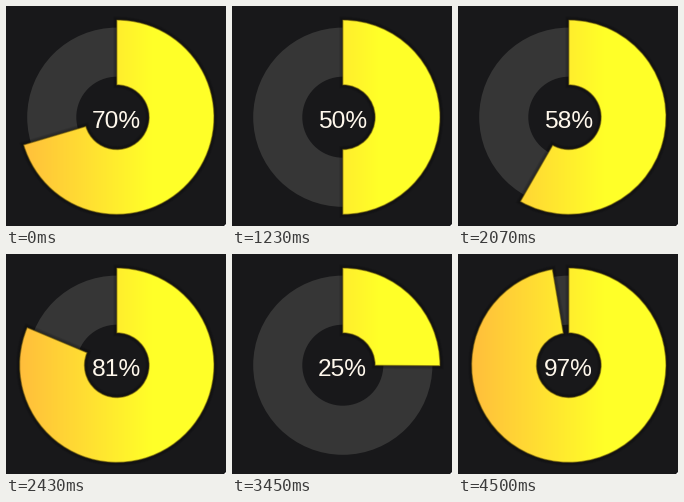
Recreate the animation shown at these times as a matplotlib script. Size 220 by 220 pixels, loop 4.53 s.

```python
import matplotlib.pyplot as plt
import numpy as np
from matplotlib.animation import FuncAnimation
from matplotlib.colors import LinearSegmentedColormap
from matplotlib.patches import Circle, Polygon, Wedge

SIZE, DPI = 220, 100
LOOP_MS, STEP_MS = 4530, 30
PX = 72 / DPI
CENTER = (110.8, 111.2)
BACKGROUND = "#18181a"

# (time in ms, percent): the dial eases from one pose to the next
POSES = [
    (0, 70.4), (540, 48.3), (990, 58), (1080, 58), (1230, 50), (1800, 65),
    (2070, 58.3), (2520, 84), (2760, 73.3), (2970, 73.3), (3450, 25.1),
    (3780, 14), (3960, 14), (4500, 97.3),
]


def percent_at(ms):
    for (t0, v0), (t1, v1) in zip(POSES, POSES[1:]):
        if ms <= t1:
            u = (ms - t0) / (t1 - t0)
            return v0 + (v1 - v0) * u * u * (3 - 2 * u)
    return POSES[-1][1]


fig = plt.figure(figsize=(SIZE / DPI, SIZE / DPI), dpi=DPI, facecolor=BACKGROUND)
ax = fig.add_axes([0, 0, 1, 1])
ax.axis("off")


def sector(**style):
    return ax.add_patch(Wedge(CENTER, 97.2, -90, 0, width=64.9, **style))


ax.add_patch(Circle(CENTER, 89.6, fc="#363636", lw=0, zorder=1))
ax.add_patch(Circle(CENTER, 40.5, fc=BACKGROUND, lw=0, zorder=1))
ax.add_patch(Polygon([(SIZE, SIZE - 2), (SIZE, SIZE), (SIZE - 2, SIZE)],
                     fc="white", lw=0))

shadows = [
    sector(fc="none", ec="black", alpha=0.09, lw=width * PX, zorder=2)
    for width in (7, 5, 3)
]
face = sector(fc="none", lw=0, zorder=3)
rim = sector(fc="none", ec="#5a4a08", alpha=0.5, lw=1.4 * PX, zorder=4)
wedges = shadows + [face, rim]

gold = LinearSegmentedColormap.from_list(
    "gold", [(0, "#ffbe3c"), (0.68, "#ffff28"), (1, "#ffff28")])
fill = ax.imshow(np.linspace(0, 1, 400)[None, :], cmap=gold, aspect="auto",
                 extent=(13, 209, 209, 13), zorder=3)
ax.set_xlim(0, SIZE)
ax.set_ylim(SIZE, 0)

label = ax.text(110.7, 121.5, "", color="#fff8ec", fontsize=24.5 * PX,
                family="Liberation Sans", ha="center", va="baseline", zorder=5)


def draw(frame):
    percent = percent_at(frame * STEP_MS)
    for wedge in wedges:
        wedge.set_theta2(-90 + 3.6 * percent)
    fill.set_clip_path(face)
    label.set_text(f"{percent:.0f}%")
    return [*wedges, fill, label]


anim = FuncAnimation(fig, draw, frames=LOOP_MS // STEP_MS, interval=STEP_MS,
                     repeat=True, repeat_delay=0)
plt.show()
```
